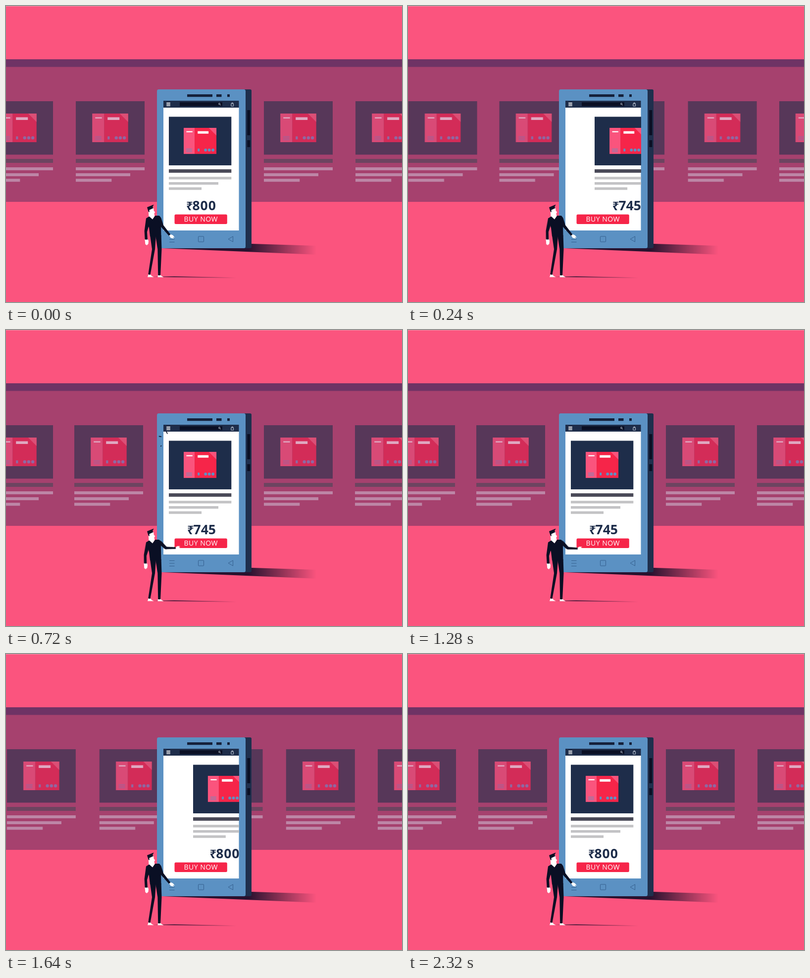
An HTML page that plays this animation: 800 by 600 pixels, repeating every 2.4 s.

```html
<!DOCTYPE html>
<html lang="en">
<head>
<meta charset="utf-8">
<title>Price comparison</title>
<style>
html, body { margin: 0; width: 100%; height: 100%; overflow: hidden; background: #fb547e; }
svg { display: block; width: 100%; height: 100%; }

.shelf { --left: #d94a76; --right: #d32c58; --label: #dfa8c1; --fold: #db4f76; --dot: #8f68a2; }
.screen { --left: #fa547d; --right: #f62549; --label: #fff; --fold: #f9547c; --dot: #5b93c6; }

.card, .slide, .upper, .fore, .rest-arm, .buy, .tick {
  animation: 2400ms linear infinite both;
}
.card { animation-name: card; }
.slide { animation-name: slide; }
.upper { animation-name: upper; transform-origin: 310px 428px; }
.fore { animation-name: fore; transform-origin: 315.6px 446.2px; }
.rest-arm { animation-name: rest-arm; transform-origin: 287px 432px; }
.buy { animation-name: press; transform-origin: 393.7px 432px; }
.tick { animation-name: tick; animation-delay: calc(var(--i) * 38ms); }

@keyframes card {
  0% { transform: translateX(var(--a)); animation-timing-function: cubic-bezier(.3, 0, .5, 1); }
  16.75%, 55.08% { transform: translateX(var(--b)); animation-timing-function: cubic-bezier(.333, 0, .667, 1); }
  74.67%, 100% { transform: translateX(var(--c)); }
}
@keyframes slide {
  0% { transform: translateX(0); animation-timing-function: cubic-bezier(.3, 0, .5, 1); }
  16.96%, 55.25% { transform: translateX(calc(-1px * var(--s))); animation-timing-function: cubic-bezier(.333, 0, .667, 1); }
  74.83%, 100% { transform: translateX(calc(-2px * var(--s))); }
}
@keyframes upper {
  0%, 16% { transform: rotate(0deg); animation-timing-function: ease-in-out; }
  27%, 52% { transform: rotate(-26deg); animation-timing-function: ease-in-out; }
  61%, 100% { transform: rotate(0deg); }
}
@keyframes fore {
  0%, 16% { transform: rotate(0deg) scale(1); animation-timing-function: ease-in-out; }
  27%, 52% { transform: rotate(-24deg) scale(.84); animation-timing-function: ease-in-out; }
  61%, 100% { transform: rotate(0deg) scale(1); }
}
@keyframes rest-arm {
  0% { transform: rotate(0deg); animation-timing-function: ease-in-out; }
  10%, 30% { transform: rotate(2.5deg); animation-timing-function: ease-in-out; }
  40%, 100% { transform: rotate(0deg); }
}
@keyframes press {
  0%, 25% { transform: scale(1); }
  27.5% { transform: scale(.97); }
  30%, 100% { transform: scale(1); }
}
@keyframes tick {
  0%, 25.5% { transform: translateX(8px) scaleX(0); }
  27% { transform: translateX(13px) scaleX(6); }
  28.5% { transform: translateX(20px) scaleX(5); }
  30% { transform: translateX(24px) scaleX(2.5); }
  31% { transform: translateX(25px) scaleX(0); }
  31.1%, 77% { transform: translateX(8px) scaleX(0); }
  80% { transform: translateX(13px) scaleX(6); }
  83% { transform: translateX(20px) scaleX(5); }
  86% { transform: translateX(24px) scaleX(2.5); }
  88%, 100% { transform: translateX(25px) scaleX(0); }
}

.price { font: 700 26.5px "Open Sans", "Noto Sans", sans-serif; fill: #1e2d4a; }
.rupee { font: 600 24px "Noto Sans", "DejaVu Sans", sans-serif; fill: #1e2d4a; }
.label { font: 400 14px "Open Sans", "Noto Sans", sans-serif; letter-spacing: .5px; fill: #fff; }
</style>
</head>
<body>
<svg viewBox="0 0 800 600" preserveAspectRatio="none">
  <defs>
    <clipPath id="view"><rect x="318" y="206" width="152.5" height="249"/></clipPath>
    <linearGradient id="phoneShade" gradientUnits="userSpaceOnUse" x1="490" y1="0" x2="627" y2="0">
      <stop offset="0" stop-color="#28122f"/>
      <stop offset="1" stop-color="#28122f" stop-opacity="0"/>
    </linearGradient>
    <linearGradient id="manShade" gradientUnits="userSpaceOnUse" x1="330" y1="0" x2="465" y2="0">
      <stop offset="0" stop-color="#28122f"/>
      <stop offset="1" stop-color="#28122f" stop-opacity="0"/>
    </linearGradient>

    <g id="box">
      <rect width="24.5" height="58" fill="var(--left)"/>
      <rect x="24.2" width="48.3" height="58" fill="var(--right)"/>
      <path d="M55.5 0H72.5V17Z" fill="var(--fold)"/>
      <path d="M6 7.5H19.5V10H6ZM31 7.5H55V13H31Z" fill="var(--label)"/>
      <path d="M5.5 46.5H18.5M5.5 48.8H18.5M5.5 51.1H18.5M5.5 53.4H18.5" stroke="var(--dot)" stroke-width=".8"/>
      <g fill="var(--dot)">
        <rect x="31" y="46.3" width="4.2" height="6"/>
        <circle cx="48.5" cy="49.3" r="3.2"/>
        <circle cx="56.7" cy="49.3" r="3.2"/>
        <circle cx="64.9" cy="49.3" r="3.2"/>
      </g>
    </g>

    <g id="card">
      <rect y="193" width="139" height="108.3" fill="#573759"/>
      <use href="#box" x="33.2" y="218"/>
      <rect y="310" width="139" height="8" fill="#6d4460"/>
      <path d="M0 327H139V333H0ZM0 339H110V345H0ZM0 350.2H72.3V356.2H0Z" fill="#bd86a6"/>
    </g>

    <g id="page">
      <rect x="329" y="224.5" width="126.3" height="98.5" fill="#1e2d4a"/>
      <use href="#box" transform="translate(359 247) scale(.911)"/>
      <rect x="329" y="331" width="126.3" height="7" fill="#4a4a58"/>
      <path d="M329 346.3H455.3V351.5H329ZM329 357H429V362.3H329ZM329 367.5H395V372.8H329Z" fill="#c3c3c5"/>
    </g>

    <g id="p800">
      <text class="rupee" x="364" y="414">₹</text>
      <text class="price" x="376.6" y="414.3" letter-spacing=".9">800</text>
    </g>
    <g id="p745">
      <text class="rupee" x="366" y="414">₹</text>
      <text class="price" x="378.6" y="414.3">745</text>
    </g>
    <path id="tick" d="M-.5 0H.5" stroke="#0a0f24" stroke-width="1.8"/>
  </defs>

  <rect width="800" height="600" fill="#fb547e"/>
  <rect width="800" height=".8" fill="#f0a0b4"/>
  <rect y="108" width="800" height="16" fill="#6f3365"/>
  <rect y="123.5" width="800" height="273.5" fill="#a6416e"/>

  <g class="shelf">
    <use class="card" href="#card" style="--a:-44px; --b:-229px; --c:-414px"/>
    <use class="card" href="#card" style="--a:141px; --b:-44px; --c:-229px"/>
    <use class="card" href="#card" style="--a:331px; --b:138px; --c:-42px"/>
    <use class="card" href="#card" style="--a:521px; --b:334px; --c:142px"/>
    <use class="card" href="#card" style="--a:706px; --b:521px; --c:334px"/>
    <use class="card" href="#card" style="--a:890px; --b:705px; --c:521px"/>
    <use class="card" href="#card" style="--a:1076px; --b:890px; --c:706px"/>
  </g>

  <!-- phone -->
  <path d="M316 491L496 482L627 486V504Z" fill="url(#phoneShade)"/>
  <path d="M478 169H493Q496 169 496 172V488Q496 491 493 491H478Z" fill="#1f2f4d"/>
  <rect x="305" y="169" width="179" height="322" rx="3.5" fill="#5b91c3"/>
  <path d="M487.3 211H493.3V262H487.3ZM487.3 272H493.3V286H487.3Z" fill="#0a0f24"/>
  <path d="M366 179H417V184.3H366ZM425 179H435.5V184.3H425ZM447 179H452V184.3H447Z" fill="#15203a"/>
  <rect x="318" y="192" width="152.5" height="14.5" fill="#1e2d4a"/>
  <path d="M324.2 196.5H331.8M324.2 199.3H331.8M324.2 202.1H331.8" stroke="#fff" stroke-width="1.5"/>
  <rect x="351" y="195" width="86" height="8" fill="#0a0f24"/>
  <g fill="none" stroke="#cdd6e2" stroke-width=".9">
    <circle cx="431" cy="198.4" r="1.5"/>
    <path d="M432.2 199.6L434 201.4"/>
    <path d="M454.8 198H459.6V203H454.8ZM456 198V196.2H458.4V198"/>
  </g>
  <rect x="318" y="206" width="152.5" height="249" fill="#fff"/>
  <g class="screen" clip-path="url(#view)">
    <g class="slide" style="--s:192">
      <use href="#page"/>
      <use href="#page" x="192"/>
      <use href="#page" x="384"/>
    </g>
    <g class="slide" style="--s:187">
      <use href="#p800"/>
      <use href="#p745" x="187"/>
      <use href="#p800" x="374"/>
    </g>
    <g class="buy">
      <rect x="340.5" y="422.5" width="106.3" height="19.5" rx="2.5" fill="#f62549"/>
      <text class="label" x="393.7" y="437.4" text-anchor="middle">BUY NOW</text>
    </g>
  </g>
  <g fill="none" stroke="#35608f" stroke-width="1">
    <path d="M330 467.5H340.5M330 473H340.5M330 478.5H340.5"/>
    <rect x="388.5" y="467" width="11" height="11" rx="1"/>
    <path d="M449 472.5L458.5 467V478Z"/>
  </g>

  <g transform="translate(331 219)">
    <g transform="rotate(138)"><use class="tick" href="#tick" style="--i:0"/></g>
    <g transform="rotate(189)"><use class="tick" href="#tick" style="--i:1"/></g>
    <g transform="rotate(241)"><use class="tick" href="#tick" style="--i:2"/></g>
    <g transform="rotate(292)"><use class="tick" href="#tick" style="--i:3"/></g>
    <g transform="rotate(344)"><use class="tick" href="#tick" style="--i:4"/></g>
    <g transform="rotate(35)"><use class="tick" href="#tick" style="--i:5"/></g>
  </g>

  <!-- shopper -->
  <path d="M296 549L340 548L465 550.2V551.8Z" fill="url(#manShade)"/>
  <g fill="#fff">
    <path d="M288 543.5L292 544L294 547L298.5 549.6H286Z"/>
    <path d="M307 544.5H312L314 547.2L318.5 549.8H306.5Z"/>
    <path d="M287.5 412L298 408.5L298.6 415L301.2 418L299.4 420.5L300.4 426L296 433L288.5 427Z"/>
  </g>
  <g fill="#0a0f24">
    <path d="M285 408L298.5 402.4L296 407.8L298 409.5L289.5 413.5L289.8 418L287.8 417Z"/>
    <path d="M283 430.5L289.3 426.5L296 432.5L301.3 425L309 425L312.8 429L313.5 467H291L289 450Z"/>
    <path d="M291 465H303L301 493L291.4 545L287.3 544L295 493Z"/>
    <path d="M302 465H313.6L314.5 493L312 546H307.2L306.3 493Z"/>
  </g>
  <g class="rest-arm">
    <path d="M280.3 472.5L286 472L288 476L287.5 482L284.5 485L281.5 483Z" fill="#fff"/>
    <path d="M283 430.5L290 431L289.5 442L285 458L286 473.5H280.6L279.6 456Z" fill="#0a0f24"/>
  </g>
  <g class="upper">
    <path d="M306 425L310 425.2L313.5 430L318.3 445.5L316.5 449L313 447.5L307 434Z" fill="#0a0f24"/>
    <g class="fore">
      <path d="M328.5 464L332.5 462.8L337 464.5L341.3 469.5L337.5 468.3L339 471.6L333 470.3Z" fill="#fff"/>
      <path d="M318.3 444.8L332.3 463L329.2 465.8L313.3 448Z" fill="#0a0f24"/>
    </g>
  </g>
</svg>
</body>
</html>
```
